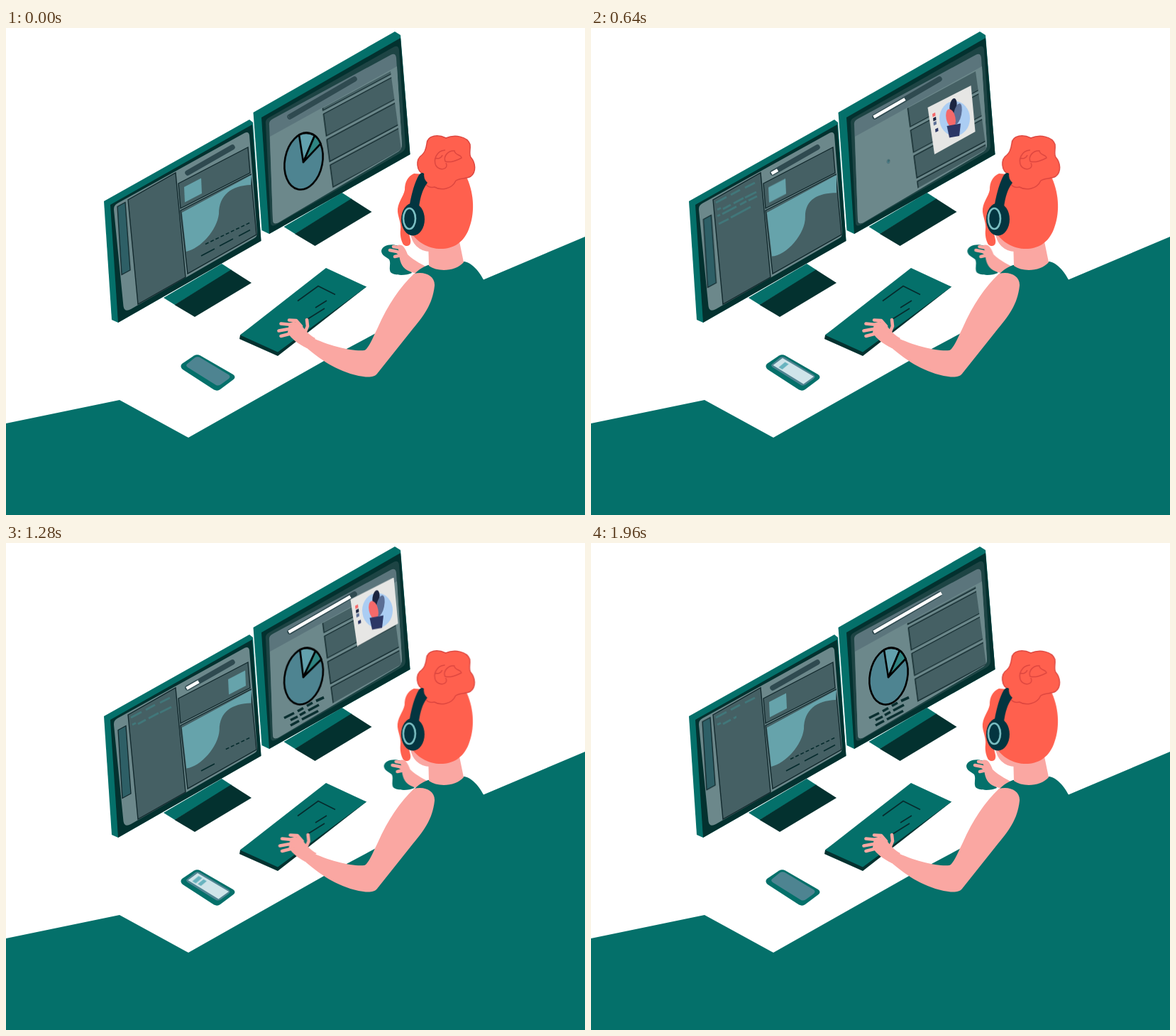
Recreate the animation shown at these times as an HTML page. Size 816 by 686 pixels, loop 2 s.

```html
<!DOCTYPE html>
<html lang="en">
<head>
<meta charset="utf-8">
<title>At the desk</title>
<style>
html, body { margin: 0; width: 100%; height: 100%; overflow: hidden; background: #fff; }
svg { display: block; width: 100vw; height: 100vh; }

.teal { fill: #04706a; }
.dark { fill: #03312f; }
.screen { fill: #6c888b; }
.panel { fill: #456064; stroke: #12292d; stroke-width: 1.4; }
.sky { fill: #66a3ab; }
.skin { fill: #faa7a2; }
.hair { fill: #ff604e; }
.finger { fill: none; stroke: #faa7a2; stroke-width: 4.6; stroke-linecap: round; stroke-linejoin: round; }
.thin { fill: none; stroke: #062b2d; stroke-width: 1.6; }
.code { fill: none; stroke: #41777a; stroke-width: 3; }
.caption { fill: none; stroke: #0a2f30; stroke-width: 3.6; }
.track { fill: none; stroke: #2f4a50; stroke-width: 7.5; stroke-linecap: round; }
.bar { fill: none; stroke: #fff; stroke-width: 4.5; stroke-dasharray: 100 200; }

.anim { animation: 2s linear infinite; }

#head { transform-origin: 610px 340px; animation: nod .6666667s ease-in-out infinite; }
@keyframes nod { 50% { transform: rotate(-2.8deg); } }

#cards { animation: scroll 1s linear infinite; }
@keyframes scroll { to { transform: translateY(36px); } }

#slider { animation-name: slide; }
@keyframes slide {
  14% { transform: translate(.6px, 8px); }
  32% { transform: translate(1.4px, 18px); }
  42%, 52% { transform: translate(1.6px, 19px); }
  64% { transform: translate(1px, 12px); }
  82% { transform: translate(.2px, 2px); }
}

#tile { animation-name: tile; }
@keyframes tile {
  14% { transform: translate(5px, -2.6px); }
  32% { transform: translate(-1px, .5px); }
  52% { transform: translate(2px, -1px); }
  64% { transform: translate(62px, -32px); }
  72%, 82% { transform: translate(74px, -37px); }
  97% { transform: none; }
}

#area { animation-name: area; }
@keyframes area {
  0%, 82%, 100% { d: path("M248 260 L346 207 L345 221 C318 222 300 235 300 262 C297 285 275 310 254 315 Z"); }
  34% { d: path("M248 260 L346 207 L346 233 C320 233 302 242 302 266 C303 290 275 322 255 322 Z"); }
}

#barL { animation-name: barL; }
@keyframes barL {
  0%, 94%, 100% { stroke-dashoffset: 100; }
  14% { stroke-dashoffset: 94; }
  32% { stroke-dashoffset: 87; }
  52% { stroke-dashoffset: 80; }
  64%, 84% { stroke-dashoffset: 74; }
}
#barR { animation-name: barR; }
@keyframes barR {
  0% { stroke-dashoffset: 100; }
  14% { stroke-dashoffset: 80; }
  32% { stroke-dashoffset: 54; }
  52% { stroke-dashoffset: 26; }
  64% { stroke-dashoffset: 9; }
  80%, 100% { stroke-dashoffset: 0; }
}

#pie { transform-origin: 419px 188px; animation-name: pie; }
@keyframes pie {
  14% { transform: scale(.79); }
  32% { transform: scale(.07); }
  34% { transform: scale(0); }
  52% { transform: scale(.74); }
  64% { transform: rotate(2deg); }
  82% { transform: rotate(14deg); }
  97% { transform: none; }
}

#poster { animation-name: poster; }
@keyframes poster {
  0% { transform: translate(509px, 130px) scale(0); }
  14% { transform: translate(509.5px, 129px) scale(.68, .74); }
  24%, 32% { transform: translate(509px, 129px); }
  52% { transform: translate(516px, 109px); }
  64%, 76% { transform: translate(520px, 96.5px); }
  82% { transform: translate(521px, 93px) scale(.88, .9); }
  94%, 100% { transform: translate(521px, 93px) scale(0); }
}

#dots { transform-origin: 345px 0; animation-name: dots; }
@keyframes dots {
  0%, 80%, 100% { transform: none; }
  14% { transform: scaleX(.98); }
  29%, 50% { transform: scaleX(0); }
  52% { transform: scaleX(.09); }
  64% { transform: scaleX(.55); }
}
#dashes { transform-origin: 274px 0; animation-name: dashes; }
@keyframes dashes {
  0%, 96%, 100% { transform: none; }
  14% { transform: scaleX(.55); }
  29%, 50% { transform: scaleX(0); }
  52% { transform: scaleX(.07); }
  64% { transform: scaleX(.29); }
  82% { transform: scaleX(.65); }
}
#lines { transform-origin: 388px 0; animation-name: lines; }
@keyframes lines {
  0%, 36% { transform: scaleX(0); }
  51%, 100% { transform: none; }
}

#row1, #row2, #row3, #row4 { transform-origin: 174px 0; }
#row1 { animation-name: row1; }
#row2 { animation-name: row2; }
#row3 { animation-name: row3; }
#row4 { animation-name: row4; }
@keyframes row1 { 0% { transform: scaleX(0); } 13%, 100% { transform: none; } }
@keyframes row2 {
  0%, 12% { transform: scaleX(0); }
  14% { transform: scaleX(.27); }
  22%, 66% { transform: none; }
  78%, 84% { transform: scaleX(0); }
  98%, 100% { transform: scaleX(.5); }
}
@keyframes row3 {
  0%, 20%, 62%, 68%, 94%, 100% { transform: scaleX(0); }
  28%, 54%, 80%, 84% { transform: none; }
}
@keyframes row4 {
  0%, 26%, 58%, 100% { transform: scaleX(0); }
  32%, 40% { transform: none; }
  52% { transform: scaleX(.2); }
}

#glass { animation-name: glass; }
@keyframes glass { 0%, 5%, 78%, 100% { opacity: 0; } 12%, 70% { opacity: 1; } }
#chip1 { animation-name: chip1; }
@keyframes chip1 {
  0%, 10% { transform: translate(282px, 481px) scale(0); }
  14% { transform: translate(281.5px, 481px) scale(.4); }
  28%, 34% { transform: translate(271.5px, 476px); }
  44%, 100% { transform: translate(269.5px, 474.5px); }
}
#chip2 { animation-name: chip2; }
@keyframes chip2 {
  0%, 38% { transform: translate(282px, 482px) scale(0); }
  48%, 54% { transform: translate(279px, 480px) scale(.95); }
  64%, 100% { transform: translate(276.5px, 478.5px) scale(.9); }
}

#mouse { animation-name: mouse; }
@keyframes mouse {
  0%, 26% { transform: none; }
  32% { transform: translateX(1.4px); }
  46%, 84% { transform: translateX(3.6px); }
  96%, 100% { transform: none; }
}
#typing { animation-name: typing; }
@keyframes typing {
  0%, 34% { transform: none; }
  46%, 84% { transform: translateX(1.6px); }
  96%, 100% { transform: none; }
}
</style>
</head>
<body>
<svg viewBox="0 0 816 686" preserveAspectRatio="none">
  <defs>
    <clipPath id="cTile"><path d="M243 219 L341 168 L344 204 L246 254 Z"/></clipPath>
    <clipPath id="cCards"><path d="M444 114 L542 61 L557 171 L460 226 Z"/></clipPath>
    <clipPath id="cDots"><rect id="dots" class="anim" x="278" y="260" width="67" height="60"/></clipPath>
    <clipPath id="cDashes"><rect id="dashes" class="anim" x="274" y="270" width="71" height="60"/></clipPath>
    <clipPath id="cLines"><rect id="lines" class="anim" x="388" y="205" width="64" height="60"/></clipPath>
    <clipPath id="c1"><rect id="row1" class="anim" x="174" y="200" width="62" height="90"/></clipPath>
    <clipPath id="c2"><rect id="row2" class="anim" x="174" y="200" width="62" height="90"/></clipPath>
    <clipPath id="c3"><rect id="row3" class="anim" x="174" y="200" width="62" height="90"/></clipPath>
    <clipPath id="c4"><rect id="row4" class="anim" x="174" y="200" width="62" height="90"/></clipPath>
    <path id="chip" d="M-7 2 L2 -5.500 L7 -2.500 L-2 5 Z" fill="#68b3bf"/>
    <g id="stand">
      <path class="teal" d="M222 380 L304 332 L318 341 L238 390 Z"/>
      <path class="dark" d="M237.500 390 L317 340.500 L346 359 L266 407 Z"/>
    </g>
  </defs>

  <use href="#stand"/>
  <use href="#stand" x="169.500" y="-100"/>

  <!-- right monitor -->
  <path class="teal" d="M348.500 119 L548 5 L556 10 L569.500 178 L371 290 L360.500 285 Z"/>
  <path class="dark" d="M360 126 L556 14 L569.500 178 L371 290 Z"/>
  <path fill="#1d4444" d="M366 135 Q365 129 371 126 L546 27 Q553 23 554 31 L563 166 Q563 172 558 175 L381 277 Q373 281 373 274 Z"/>
  <path fill="#5b757c" d="M371 137 Q370 131 376 128 L542 38 Q549 34 550 42 L558 164 Q558 171 553 174 L384 274 Q376 278 376 270 Z"/>
  <path class="screen" d="M372 153 L551 54 L558 164 Q558 171 553 174 L384 274 Q376 278 376 270 Z"/>
  <path class="track" d="M400 125 L491 72"/>
  <path id="barR" class="bar anim" pathLength="100" d="M398.500 125.500 L494 70.500"/>
  <g clip-path="url(#cCards)">
    <g transform="matrix(1 -.535 .13 1 447.500 121)">
      <g id="cards">
        <path class="panel" d="M0 -72 h98 v31 h-98 Z M0 -36 h98 v31 h-98 Z M0 0 h98 v31 h-98 Z M0 36 h98 v31 h-98 Z M0 72 h98 v31 h-98 Z"/>
      </g>
    </g>
  </g>
  <g id="pie" class="anim" stroke="#000" stroke-width="2.600" stroke-linejoin="round">
    <ellipse cx="419.500" cy="187.500" rx="26.500" ry="40.500" transform="rotate(11 419.500 187.500)" fill="#4e8491"/>
    <path fill="#62a1ad" d="M419 189 L413 150.500 Q424 145 435 151.500 Z"/>
    <path fill="#2f8583" d="M419 189 L435 151.500 Q440 155 443.500 163 Z"/>
  </g>
  <path class="caption" clip-path="url(#cLines)" d="M392 246.500 l14 -7 M411 237 l8 -4.500 M424 229.500 l8 -4.500 M437 222.500 l11 -5 M401 249.500 l10 -5 M414 242.500 l8 -4.500 M426 236 l15 -8 M401 257 l12 -6.500 M417 248.500 l23 -12"/>
  <g id="poster" class="anim">
    <path fill="#e6e6e4" d="M-34.500 -17 L26.500 -48 L32.500 17 L-25 49 Z"/>
    <ellipse cx="3.500" cy="-1.500" rx="21.500" ry="24.500" fill="#abcdf3"/>
    <ellipse cx="1.500" cy="-19" rx="5" ry="11" transform="rotate(8 1.500 -19)" fill="#1c2540"/>
    <ellipse cx="7.500" cy="-8" rx="5.500" ry="15" transform="rotate(12 7.500 -8)" fill="#5b6e95"/>
    <ellipse cx="-2" cy="-2" rx="6.500" ry="13" transform="rotate(-12 -2 -2)" fill="#f5696a"/>
    <path fill="#2c3766" d="M-7.500 9 L12 5.500 L10 23 L-4 25.500 Z"/>
    <path fill="#f5696a" d="M-28 -8 l4 -2 l.5 4.500 l-4 2 Z"/>
    <path fill="#1c2540" d="M-27 -2 l4 -2 l.5 4.500 l-4 2 Z"/>
    <path fill="#5b6e95" d="M-26.500 4 l4 -2 l.5 4.500 l-4 2 Z"/>
    <path fill="#2c3766" d="M-24 13.500 l4 -2 l.5 4.500 l-4 2 Z"/>
  </g>

  <!-- left monitor -->
  <path class="teal" d="M138 244 L343 129 L348 133 L359.500 299.500 L158 415 L149 411 Z"/>
  <path class="dark" d="M147 249 L347 136 L359.500 300 L158 415 Z"/>
  <path class="screen" d="M152 256 Q151.500 250 157 247 L336 148 Q342 145 343 151 L354 289 Q354 294 350 296 L176 396 Q167 401 165.500 392 Z"/>
  <path class="panel" d="M172 242 L239 204 L253 351 L186 389 Z M243 219 L341 168 L344 204 L246 254 Z M246 257 L345 206 L353 291 L256 346 Z"/>
  <path id="slider" class="anim" fill="#2e5f66" stroke="#12292d" stroke-width="1.300" d="M157 251.500 L168 245.500 L175 341 L163 347.500 Z"/>
  <g class="code">
    <path clip-path="url(#c1)" d="M176 246 l15 -8 M197 235 l13 -7 M217 225 l14 -7"/>
    <path clip-path="url(#c2)" d="M178 256 l5 -2.500 M186 255 l11 -6 M201 247 l14 -7.500 M217 239 l16 -8"/>
    <path clip-path="url(#c3)" d="M178 265 l4 -2 M185 262 l20 -10.500 M210 249 l9 -5 M222 243 l12 -6"/>
    <path clip-path="url(#c4)" d="M180 276 l14 -7 M197 267 l28 -15"/>
  </g>
  <path class="track" d="M256 204 L319 168"/>
  <path id="barL" class="bar anim" pathLength="100" d="M254.500 205 L320 167.500"/>
  <g clip-path="url(#cTile)">
    <path id="tile" class="sky anim" d="M251 224 L275 211.500 L276 233 L252 245.500 Z"/>
  </g>
  <path id="area" class="sky anim" d="M248 260 L346 207 L345 221 C318 222 300 235 300 262 C297 285 275 310 254 315 Z"/>
  <path class="thin" clip-path="url(#cDots)" stroke-dasharray="5 3" d="M281 304.500 L344 274"/>
  <path class="thin" clip-path="url(#cDashes)" d="M275 321 l19 -10 M301 307 l19 -10 M328 293 l16 -8.500"/>

  <!-- keyboard -->
  <path class="dark" d="M330 432.500 L451 345 L508 364.500 L383 462 L329 438 Z"/>
  <path class="teal" d="M451 338 L508 364.500 L383 456.500 L330 432.500 Z"/>
  <path class="thin" d="M411 384.500 L440 363.500 L464 375.500 M436 394 L452 384 M425 410 L449 395"/>

  <!-- phone -->
  <path class="teal" d="M248 473 L265 461.500 Q269.500 459 274 461.500 L320 488 Q325 491.500 320 495.500 L302 509 Q298 512 293 509.500 L249 481 Q244.500 477 248 473 Z"/>
  <path fill="#4e8491" d="M255 473.500 L266 464.500 Q270 462 274 464.500 L314 488.500 Q317 491 314 494 L303 502 Q299 504.500 296 503 L256 478 Q253 475.500 255 473.500 Z"/>
  <g id="glass" class="anim">
    <path fill="#cfe4e9" d="M256.500 475 L270 465 L314 491 L299.500 501.500 Z"/>
    <use id="chip1" class="anim" href="#chip"/>
    <use id="chip2" class="anim" href="#chip"/>
  </g>

  <!-- mouse and right hand -->
  <g id="mouse" class="anim">
    <path class="teal" d="M529 314 C530 306 543 303 553 307 L572 345 C564 349 547 349 542 344 C539 338 543 332 540 326 C535 322 529 320 529 314 Z"/>
    <path class="skin" d="M552 306 C558 304 562 308 566 319 C576 329 588 333 594 338 L588 346 C578 346 570 344 565 341 C557 336 555 328 554 319 Z"/>
    <path class="finger" d="M541 313 L551 315 L557 319 M546 308 L558 310 M548 322 L557 320"/>
  </g>

  <!-- desk edge and body -->
  <path class="teal" d="M0 557 L160 524 L257 577 L449 468.500 L521 430 L548 400 L576 346 C584 338 592 334 600 333 L646 329 C658 331 668 345 673 354.500 L816 294 V686 H0 Z"/>
  <path class="skin" d="M595 300 L596 335 C608 344 634 343 645 330 L638 296 Z"/>

  <!-- left arm -->
  <path class="skin" d="M575 346 C590 342 605 349 604 363 C601 390 589 405 570 428 L523 487 C518 493 508 492 497 490 C465 483 442 466 423 450 L429 435 C455 448 490 456 505 454 C511 452 517 436 524 422 C538 390 555 365 575 346 Z"/>
  <g id="typing" class="anim">
    <path class="skin" d="M399 416 C408 411 415 416 419 422 C424 428 428 433 436 437 L424 451 C412 445 402 438 397 429 Z"/>
    <path class="finger" d="M387.500 416.500 L403 418 M384.500 426.500 L401 423.500 M387.500 434 L403 430 M399 411.500 L409 412 L416 420 M424 411 L425 420 L421 430"/>
  </g>

  <!-- head -->
  <g id="head">
    <path class="skin" d="M570 288 C571 303 582 315 598 315 L615 308 L588 282 Z"/>
    <path class="hair" d="M575 205 C566 209 562 217 562 228 C560 238 551 247 552 259 C553 268 557 274 556 284 C555 292 557 300 560 305 C563 308 569 308 570 303 C571 299 569 295 568 290 L586 250 L588 206 Z"/>
    <path class="hair" d="M586 205 L650 212 C660 235 661 262 652 284 C644 304 628 312 610 311 C590 310 577 297 572 290 C558 270 562 215 586 205 Z"/>
    <g stroke="#dd463f" stroke-width="1.500">
      <path class="hair" d="M593 163 C594 150 610 150 620 155 C632 150 650 152 654 164 C655 172 652 176 655 182 C662 190 663 203 655 209 C648 213 640 211 634 215 C628 228 612 229 604 224 C594 226 588 220 589 206 C578 202 577 185 586 179 C590 176 592 170 593 163 Z"/>
      <path fill="none" d="M619 172 C606 173 602 186 606 194 C611 202 625 199 620 190 M619 188 C616 180 624 172 632 173 C633 180 642 178 642 183 C634 187 627 190 619 188 M605 183 C609 185 614 183 615 179"/>
    </g>
    <path fill="#033540" d="M582 207 Q586 202 589 205 Q588 212 594 218 C587 227 584 238 582 252 L569 248 C572 232 576 217 582 207 Z"/>
    <ellipse cx="573.500" cy="269.500" rx="16.500" ry="23" fill="#033540"/>
    <ellipse cx="568.500" cy="268.500" rx="8.500" ry="14.500" fill="#033540" stroke="#7cc0c4" stroke-width="2.600"/>
  </g>
</svg>
</body>
</html>
```
